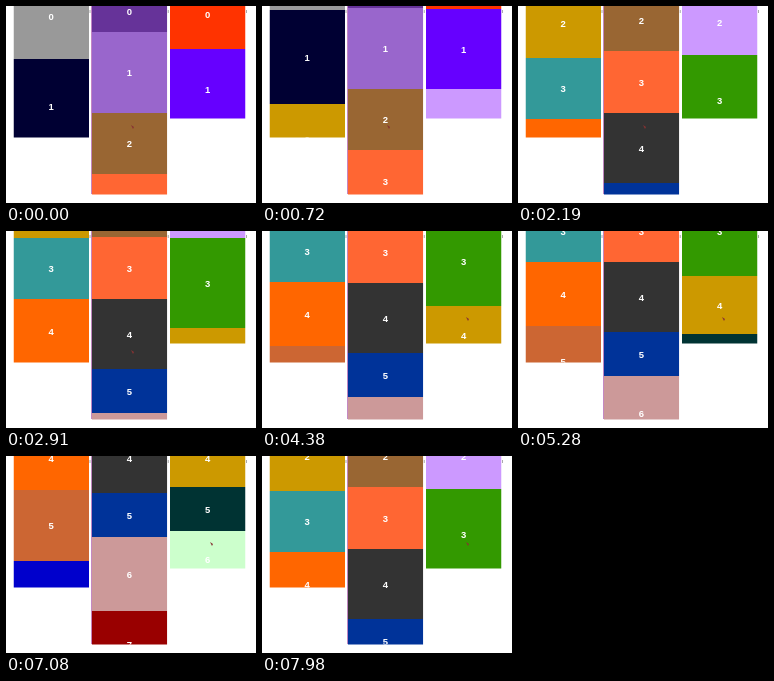
An HTML page with a canvas that plays this animation: 250 px wide and 197 px high, repeating every 8 s.

```html
<!DOCTYPE html>
<html lang="en">
<head>
<meta charset="utf-8">
<title>Linked columns</title>
<style>
  html, body { margin: 0; width: 100%; height: 100%; overflow: hidden; background: #fff; }
  canvas { display: block; }
</style>
</head>
<body>
<canvas id="stage" width="250" height="197"></canvas>
<script>
const ctx = document.getElementById('stage').getContext('2d');
const LOOP = 8000, LEFT = 7.5, PITCH = 78.25, WIDTH = 75.5;

// Each column: visible height, then the height and colour of its items.
const columns = [
  { view: 131.5, heights: [86, 94, 70, 61, 64, 71, 80],
    colors: ['#999', '#003', '#c90', '#399', '#f60', '#c63', '#00c'] },
  { view: 188.5, heights: [42, 81, 61, 62, 70, 44, 74, 66],
    colors: ['#639', '#96c', '#963', '#f63', '#333', '#039', '#c99', '#900'] },
  { view: 112.5, heights: [70, 80, 66, 90, 58, 44, 56],
    colors: ['#f30', '#60f', '#c9f', '#390', '#c90', '#033', '#cfc'] }
];

// Key points of the scroll: [ms, position in items].
const keys = [
  [0, .384], [1560, 1.635], [2910, 2.893], [3500, 3.165], [4530, 3.165],
  [6090, 4.14], [6700, 4.6], [7080, 4.472], [LOOP, 2.457]
];

// Slope of the segment that starts at key i; the end segments continue outwards.
function slope(i) {
  const k = Math.min(Math.max(i, 0), keys.length - 2);
  return (keys[k + 1][1] - keys[k][1]) / (keys[k + 1][0] - keys[k][0]);
}

// Speed at a key: harmonic mean of its neighbours, zero where the scroll turns or rests.
function speed(i) {
  const a = slope(i - 1), b = slope(i);
  return a * b > 0 ? 2 * a * b / (a + b) : 0;
}

function positionAt(ms) {
  const i = keys.findIndex(key => key[0] > ms) - 1;
  const [t0, p0] = keys[i], [t1, p1] = keys[i + 1];
  const d = t1 - t0, u = (ms - t0) / d, w = 1 - u;
  return w * w * ((1 + 2 * u) * p0 + u * d * speed(i))
       + u * u * ((3 - 2 * u) * p1 - w * d * speed(i + 1));
}

// Every column shows the same fraction of its current item at the top.
function drawColumn({ view, heights, colors }, x, position) {
  const first = Math.floor(position);
  let y = -Math.round((position - first) * heights[first]);
  ctx.save();
  ctx.beginPath();
  ctx.rect(x, 0, WIDTH, view);
  ctx.clip();
  for (let i = first; i < heights.length && y < view; i++) {
    ctx.fillStyle = colors[i];
    ctx.fillRect(x, y, WIDTH, heights[i]);
    ctx.fillStyle = '#fff';
    ctx.fillText(i, x + WIDTH / 2, y + heights[i] / 2 + 3.5);
    y += heights[i];
  }
  ctx.restore();
  ctx.fillStyle = '#aaa';
  ctx.fillRect(x + WIDTH + .5, 4, 1, 3);
}

function drawPointer(ms) {
  const u = Math.min(1, Math.max(0, (ms - 3300) / 700));
  const e = u * u * (3 - 2 * u);
  ctx.save();
  ctx.translate(125 + 79 * e, 119 - 33 * e);
  ctx.fillStyle = '#833';
  ctx.beginPath();
  ctx.moveTo(0, 0);
  ctx.lineTo(3, 2);
  ctx.lineTo(2, 4);
  ctx.fill();
  ctx.restore();
}

function draw() {
  const ms = performance.now() % LOOP, position = positionAt(ms);
  ctx.fillStyle = '#fff';
  ctx.fillRect(0, 0, 250, 197);
  ctx.font = 'bold 9.5px "Liberation Sans", Arial, sans-serif';
  ctx.textAlign = 'center';
  columns.forEach((column, i) => drawColumn(column, LEFT + PITCH * i, position));
  ctx.fillStyle = 'rgba(128, 0, 128, .45)';
  ctx.fillRect(85, 0, 1, 188);
  drawPointer(ms);
  requestAnimationFrame(draw);
}
draw();
</script>
</body>
</html>
```
